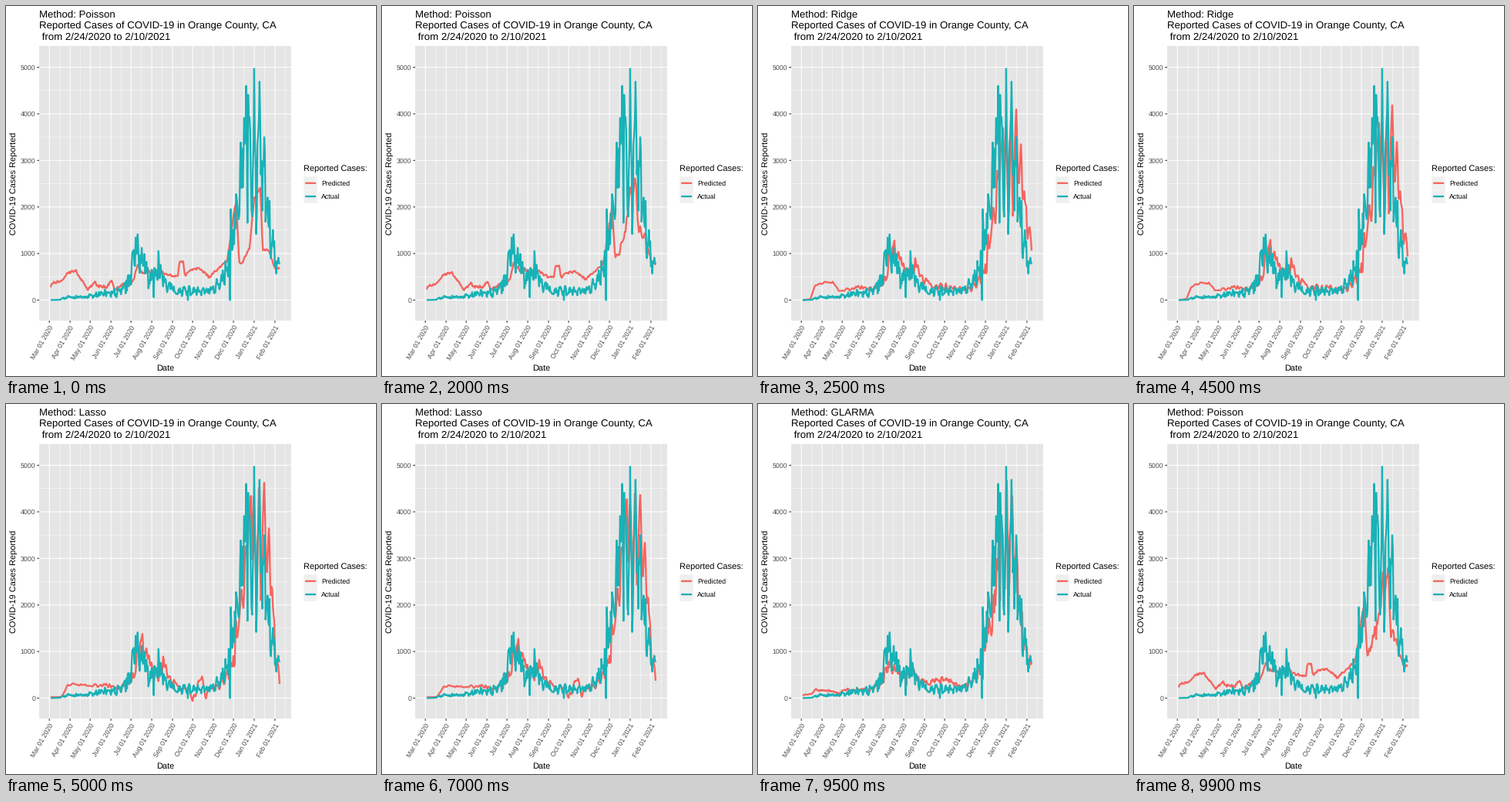
A matplotlib script for the animation above (10 s loop, 480 by 480 pixels).

```python
import numpy as np
import matplotlib.pyplot as plt
from matplotlib.animation import FuncAnimation
from matplotlib.patches import Rectangle

plt.rcParams.update({
    "font.family": "Liberation Sans",
    "text.hinting": "none",
    "path.snap": False,
    "toolbar": "None",
})

SIZE = 480
LEFT, RIGHT, TOP, BOTTOM = 43.1, 369.9, 51.9, 408.2
RED, TEAL, PANEL, KEY = "#F4655F", "#18B2B7", "#E5E5E5", "#F0F0F0"
AXIS_TEXT, TICK = "#4D4D4D", "#333333"
LINE_WIDTH, MAJOR, MINOR = 2.3, 1.07, 0.53
METHODS = ["Poisson", "Ridge", "Lasso", "GLARMA"]
HOLD, STEPS = 19, 6
CYCLE = HOLD + STEPS


def day_x(day):
    return 56.2 + 0.8685 * day


def case_y(cases):
    return 381.5 - 0.0604 * cases


days = np.arange(2, 345)
xs = day_x(days)
rng = np.random.default_rng(7)


def curve(*points):
    return np.interp(xs, *zip(*points))


def delayed(series, lag):
    return np.concatenate([np.zeros(lag), series[:-lag]])


# Daily counts: a slow level, a weekly reporting rhythm, noise and a few marked days.
level = curve((58, 0), (70, 8), (80, 70), (100, 60), (120, 120), (149, 190),
              (160, 400), (168, 1150), (176, 750), (187, 400), (198, 700),
              (206, 360), (218, 210), (260, 180), (272, 280), (283, 560),
              (291, 1100), (300, 1850), (306, 2800), (312, 3600), (318, 2600),
              (329, 3500), (335, 2700), (340, 1650), (351, 800), (355, 850))
rhythm = -0.2 * np.cos(2 * np.pi * (days - 2) / 7)
spread = curve((58, 0.5), (155, 0.5), (168, 0.2), (180, 0.4), (285, 0.4), (310, 0.22))
actual = level * (1 + rhythm + spread * rng.uniform(-1, 1, days.size))
marked = {129: 1340, 142: 990, 156: 60, 163: 1055, 207: 0, 270: 0, 271: 1950,
          288: 3250, 294: 4600, 296: 1660, 297: 4410, 302: 1960, 306: 4970,
          309: 1420, 314: 4690, 318: 1920, 329: 2130, 344: 770}
for day, cases in marked.items():
    actual[day - days[0]] = cases

# Each method follows the recent counts in its own way.
smoothed = np.convolve(actual, [0.25, 0.5, 0.25], "same")
week_ago = delayed(smoothed, 7)
week_mean = np.convolve(actual, np.full(7, 1 / 7))[:days.size]

poisson = curve((58, 290), (61, 360), (73, 420), (81, 600), (90, 635),
                (106, 230), (116, 395), (118, 310), (130, 265), (137, 430),
                (141, 230), (156, 380), (165, 420), (171, 780), (176, 590),
                (198, 630), (214, 520), (223, 520), (225, 830), (230, 830),
                (232, 530), (239, 650), (250, 690), (264, 500), (287, 850),
                (297, 2030), (299, 2050), (302.5, 780), (306, 780), (316, 1120),
                (322, 2200), (330, 2400), (333, 1080), (340, 1080), (349, 680),
                (355, 690))
poisson += rng.normal(0, 15, days.size)

ridge = 0.92 * week_ago + curve(
    (58, 0), (68, 20), (74, 310), (97, 330), (105, 140), (130, 150), (160, 60),
    (185, 150), (230, 130), (265, 50), (290, 0), (330, 0), (346, 500), (355, 250))

lasso = 1.08 * week_ago + curve(
    (58, 20), (72, 20), (80, 240), (98, 220), (125, 150), (145, 50), (200, 0),
    (235, 0), (244, -240), (248, 50), (254, 250), (259, -180), (265, 0),
    (335, 0), (345, 200), (352, -700), (355, -650))

gain = curve((58, 0.9), (160, 0.8), (170, 0.6), (190, 0.8), (290, 0.8),
             (305, 0.8), (315, 1.05), (323, 1.18), (335, 1.05), (355, 0.9))
glarma = gain * (0.7 * delayed(actual, 1) + 0.3 * week_mean) + curve(
    (58, 10), (69, 20), (75, 110), (80, 20), (105, 20), (116, 80), (120, 20),
    (200, 60), (225, 130), (241, 220), (262, 30), (355, 0))

predictions = [poisson, ridge, lasso, glarma]

fig = plt.figure(figsize=(SIZE / 72, SIZE / 72), dpi=72, facecolor="white")
ax = fig.add_axes([0, 0, 1, 1])
ax.set(xlim=(0, SIZE), ylim=(SIZE, 0))
ax.axis("off")


def segment(x, y, color, width, z):
    return ax.plot(x, y, color=color, lw=width, zorder=z,
                   solid_capstyle="butt", solid_joinstyle="round")[0]


def label(x, y, text, size, color="black", **kwargs):
    return ax.text(x, y, text, fontsize=size, color=color, va="baseline", **kwargs)


def box(x, y, width, height, color):
    ax.add_patch(Rectangle((x, y), width, height, fc=color, lw=0, zorder=0))


box(LEFT, TOP, RIGHT - LEFT, BOTTOM - TOP, PANEL)

names = "Mar Apr May Jun Jul Aug Sep Oct Nov Dec Jan Feb".split()
starts = [0, 31, 61, 92, 122, 153, 184, 214, 245, 275, 306, 337, 368]
for name, start, end in zip(names, starts, starts[1:]):
    x, middle = day_x(start), day_x((start + end) / 2)
    segment([middle, middle], [TOP, BOTTOM], "white", MINOR, 1)
    segment([x, x], [TOP, BOTTOM], "white", MAJOR, 1)
    segment([x, x], [BOTTOM, BOTTOM + 2.75], TICK, MAJOR, 1)
    year = 2021 if name in ("Jan", "Feb") else 2020
    label(x + 5.4, 416.3, f"{name} 01 {year}", 8.8, AXIS_TEXT,
          rotation=60, rotation_mode="anchor", ha="right")

for cases in range(0, 5001, 500):
    y = case_y(cases)
    major = cases % 1000 == 0
    segment([LEFT, RIGHT], [y, y], "white", MAJOR if major else MINOR, 1)
    if major:
        segment([LEFT - 2.75, LEFT], [y, y], TICK, MAJOR, 1)
        label(38.2, y + 3.2, cases, 8.8, AXIS_TEXT, ha="right")

label(206.5, 472.7, "Date", 11, ha="center")
label(13.6, 230, "COVID-19 Cases Reported", 11, rotation=90,
      rotation_mode="anchor", ha="center")
title = label(LEFT - 0.3, 14.9, "", 13.2)
label(LEFT - 0.3, 29.4, "Reported Cases of COVID-19 in Orange County, CA", 13.2)
label(LEFT - 0.3, 43.6, " from 2/24/2020 to 2/10/2021", 13.2)

label(386.4, 215, "Reported Cases:", 11)
for y, name, color in ((229.8, "Predicted", RED), (247, "Actual", TEAL)):
    box(386.4, y - 8.64, 17.28, 17.28, KEY)
    segment([388.1, 402], [y, y], color, LINE_WIDTH, 2)
    label(409.2, y + 3.2, name, 8.8)

predicted_line = segment(xs, case_y(poisson), RED, LINE_WIDTH, 3)
segment(xs, case_y(actual), TEAL, LINE_WIDTH, 4)


def update(frame):
    state, step = divmod(frame, CYCLE)
    following = (state + 1) % len(METHODS)
    blend = max(0, step - HOLD) / STEPS
    cases = (1 - blend) * predictions[state] + blend * predictions[following]
    predicted_line.set_ydata(case_y(cases))
    title.set_text("Method: " + METHODS[following if blend >= 0.5 else state])
    return predicted_line, title


anim = FuncAnimation(fig, update, frames=CYCLE * len(METHODS), interval=100,
                     repeat=True, repeat_delay=0, blit=False)
plt.show()
```
